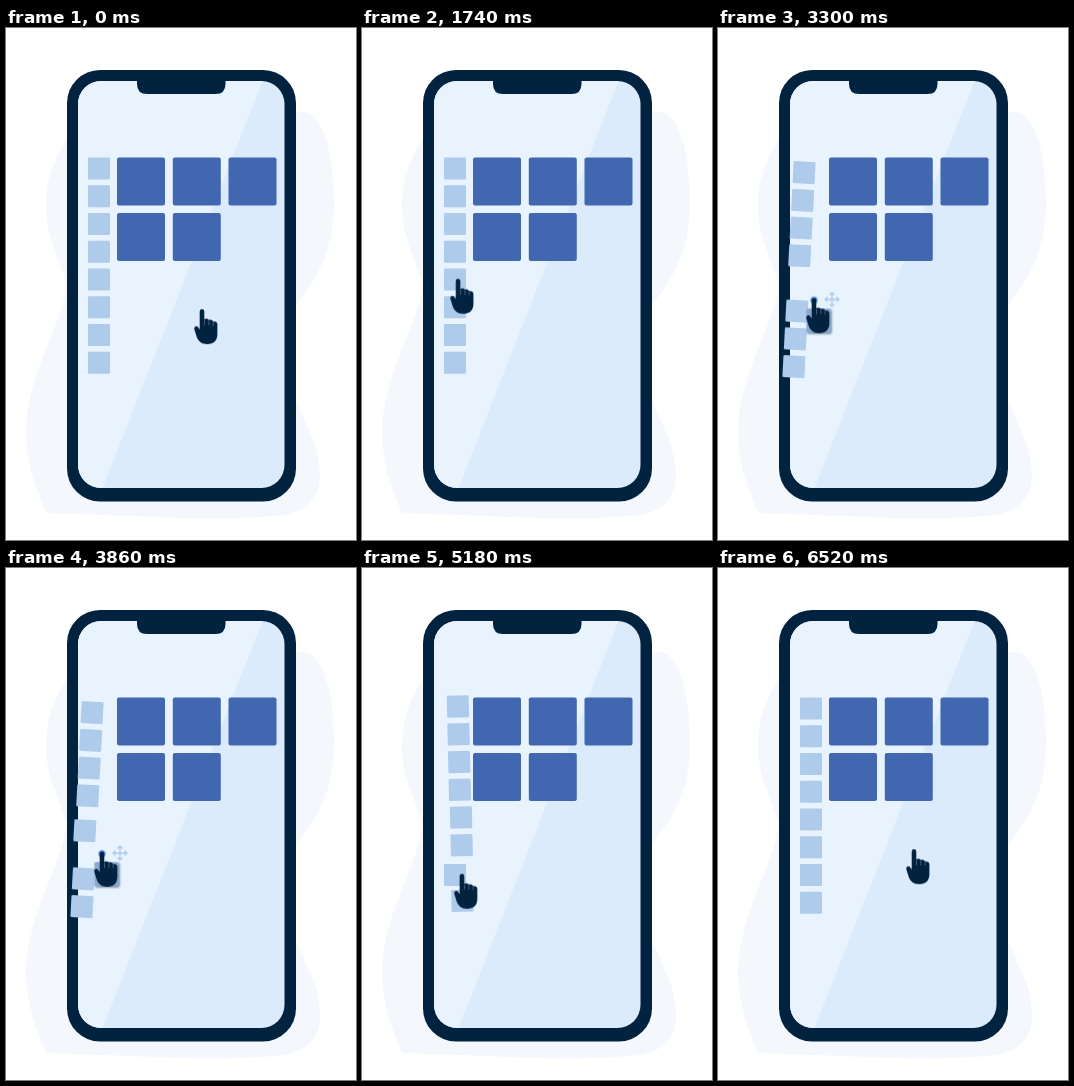
An HTML page for the animation above (7200 ms loop, 350 by 512 pixels).

```html
<!DOCTYPE html>
<html lang="en">
<head>
<meta charset="utf-8">
<title>Drag to reorder</title>
<style>
  html, body { margin: 0; width: 100%; height: 100%; overflow: hidden; background: #fff; }
  svg { display: block; width: 350px; height: 512px; }

  .tile, .lift { transform-box: fill-box; transform-origin: center; }
  .small { fill: #afcbeb; }
  .big { fill: #4167b0; }
  .anim { animation: 7200ms linear infinite; }

  .tile { animation-name: tilt; }
  .up1 { animation-name: up1; }
  .up2 { animation-name: up2; }
  .drag { animation-name: drag; }
  .lift { animation-name: lift; }
  .hint { animation-name: hint; }
  .hand-x { animation-name: hand-x; }
  .hand-y { animation-name: hand-y; }
  .press { animation-name: press; transform-origin: 3px 18px; }

  @keyframes tilt {
    0%, 30.56% { transform: rotate(0); animation-timing-function: ease-in-out; }
    38.9%, 63% { transform: rotate(3deg); animation-timing-function: ease-in-out; }
    70%, 79.5% { transform: rotate(-1.3deg); }
    88%, 100% { transform: rotate(0); }
  }
  @keyframes up1 {
    0%, 51.39% { transform: translateY(0); animation-timing-function: ease-in-out; }
    54.86%, 100% { transform: translateY(-27.75px); }
  }
  @keyframes up2 {
    0%, 62.5% { transform: translateY(0); animation-timing-function: ease-in-out; }
    65.97%, 100% { transform: translateY(-27.75px); }
  }
  @keyframes drag {
    0%, 34.72% { transform: translateY(0); }
    66.53%, 100% { transform: translateY(55.5px); }
  }
  @keyframes lift {
    0%, 30.56% { transform: scale(1); fill: #afcbeb; filter: drop-shadow(0 0 0 rgba(1,35,64,0)); }
    34.72%, 66.53% { transform: scale(1.09); fill: #8aa8d0; filter: drop-shadow(1px 1.3px 1px rgba(1,35,64,.6)); }
    70.14%, 100% { transform: scale(1); fill: #afcbeb; filter: drop-shadow(0 0 0 rgba(1,35,64,0)); }
  }
  @keyframes hint {
    0%, 30.56% { opacity: 0; }
    34.72%, 66.53% { opacity: 1; }
    70.14%, 100% { opacity: 0; }
  }
  @keyframes hand-x {
    0% { transform: translateX(196px); animation-timing-function: cubic-bezier(.333,.2,.667,.77); }
    18.89%, 71.39% { transform: translateX(96px); animation-timing-function: cubic-bezier(.333,.43,.667,1.1); }
    90.56%, 100% { transform: translateX(196px); }
  }
  @keyframes hand-y {
    0% { transform: translateY(281.2px); animation-timing-function: cubic-bezier(.333,.45,.667,.875); }
    18.89%, 34.72% { transform: translateY(250.8px); }
    66.53%, 71.39% { transform: translateY(306.3px); animation-timing-function: cubic-bezier(.333,.2,.667,.6); }
    81.67% { transform: translateY(292.3px); animation-timing-function: cubic-bezier(.33,.33,.6,1); }
    86.67% { transform: translateY(278.6px); animation-timing-function: ease-in-out; }
    90.56%, 100% { transform: translateY(281.2px); }
  }
  @keyframes press {
    0%, 24.17% { transform: scale(1); animation-timing-function: ease-in-out; }
    25.83% { transform: scale(.93); animation-timing-function: ease-in-out; }
    27.5%, 100% { transform: scale(1); }
  }
</style>
</head>
<body>
<svg viewBox="0 0 350 512">
  <defs>
    <clipPath id="screen"><rect x="72" y="53" width="206.5" height="407" rx="23"/></clipPath>
    <radialGradient id="glow">
      <stop offset=".45" stop-color="#1f63cc"/>
      <stop offset="1" stop-color="#1f63cc" stop-opacity="0"/>
    </radialGradient>
    <rect id="sq" width="22" height="22" rx="1.2"/>
    <rect id="card" width="48" height="48" rx="2"/>
  </defs>

  <path fill="#f4f8fc" d="M40 485C120 487 200 494 270 488C300 485 314 472 314 447C314 420 303 403 290 372V277C306 255 328 230 328 175C328 125 317 84 297 84H280L62 109C48 130 40 150 40 178C40 212 55 232 60 256C60 290 20 345 20 405C20 435 30 462 40 485Z"/>

  <rect x="61" y="42" width="229" height="431.5" rx="33" fill="#012340"/>
  <g clip-path="url(#screen)">
    <rect x="72" y="53" width="207" height="408" fill="#dcebfc"/>
    <path d="M72 53H256.500L96.500 460H72Z" fill="#e8f3fe"/>
  </g>
  <path d="M131 50H219.500V56Q219.500 66 209.500 66H141Q131 66 131 56Z" fill="#012340"/>

  <g class="big">
    <use href="#card" x="111" y="129.500"/>
    <use href="#card" x="166.800" y="129.500"/>
    <use href="#card" x="222.500" y="129.500"/>
    <use href="#card" x="111" y="185"/>
    <use href="#card" x="166.800" y="185"/>
  </g>

  <g class="small">
    <use class="tile anim" href="#sq" x="82" y="129.500"/>
    <use class="tile anim" href="#sq" x="82" y="157.250"/>
    <use class="tile anim" href="#sq" x="82" y="185"/>
    <use class="tile anim" href="#sq" x="82" y="212.750"/>
    <g class="up1 anim"><use class="tile anim" href="#sq" x="82" y="268.250"/></g>
    <g class="up2 anim"><use class="tile anim" href="#sq" x="82" y="296"/></g>
    <use class="tile anim" href="#sq" x="82" y="323.750"/>
  </g>

  <g class="drag anim">
    <use class="lift anim" href="#sq" x="82" y="240.500"/>
    <g class="hint anim">
      <circle cx="96" cy="252.800" r="4.500" fill="url(#glow)"/>
      <path transform="translate(114 252)" fill="none" stroke="#afcbeb" stroke-width="1.400" stroke-linecap="round" stroke-linejoin="round"
        d="M-7 0H7M0-7V7M-2-5L0-7L2-5M-2 5L0 7L2 5M-5-2L-7 0L-5 2M5-2L7 0L5 2"/>
    </g>
  </g>

  <g class="hand-x anim"><g class="hand-y anim"><g class="press anim">
    <path fill="#012340" d="M-2.300 2.300A2.300 2.300 0 0 1 2.300 2.300V10.300C3.500 9 6.300 9.300 6.800 11C8.500 10 10.600 10.700 11 12.400C13 11.600 15.400 12.600 15.400 15V25C15.400 31.500 11.500 35 5.500 35C-1 35-4 31.500-5.500 27L-7.600 20.300C-8.400 17.500-5.600 15.700-3.900 18L-2.300 20.300Z"/>
    <path fill="none" stroke="#dcebfc" stroke-width=".5" opacity=".6" d="M2.500 11V16M6.900 11.500V16M11.100 12.800V16.500"/>
  </g></g></g>
</svg>
</body>
</html>
```
